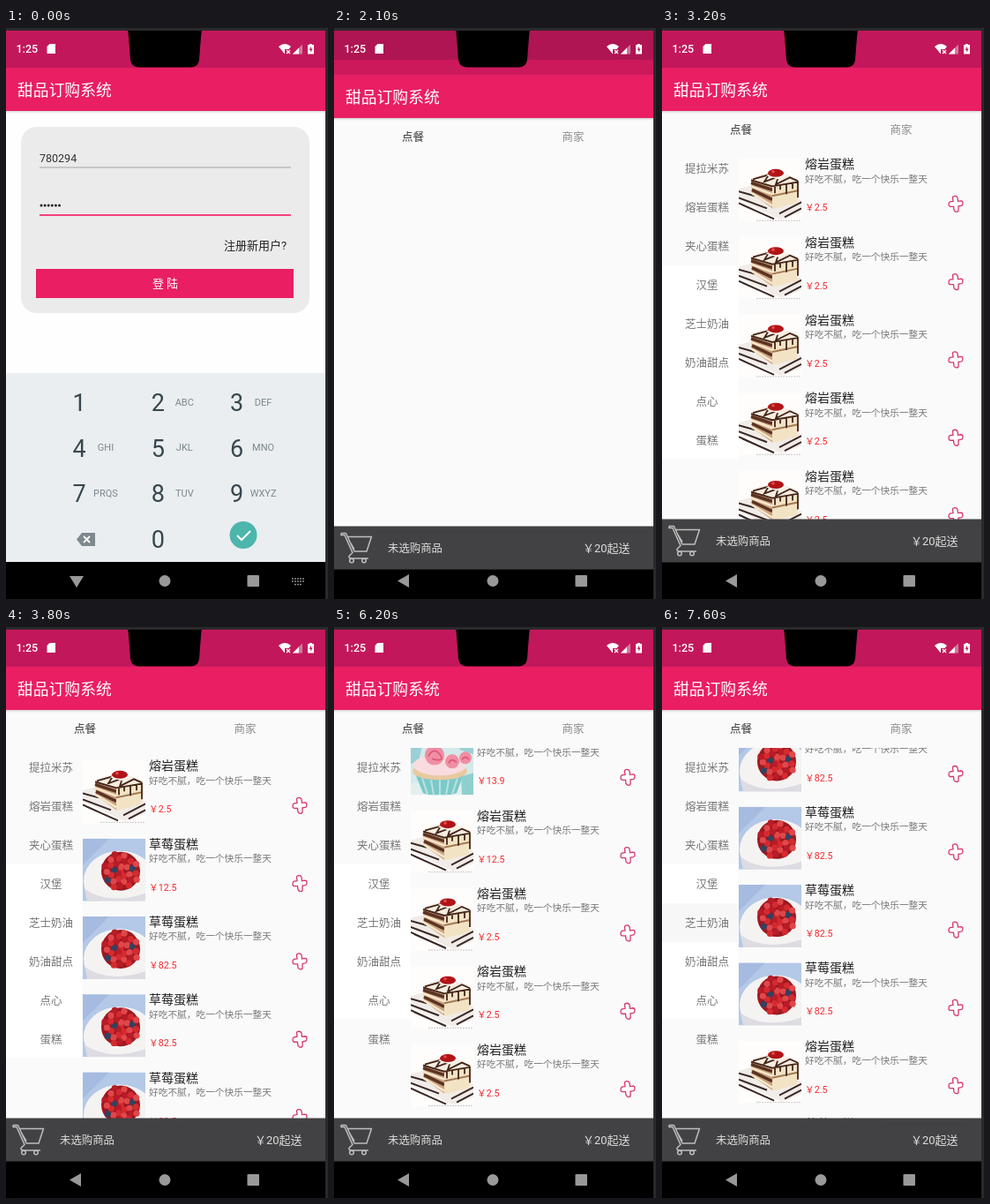
These frames come from a looping animation (365 px wide and 647 px high, 8 s). An HTML page:

```html
<!DOCTYPE html>
<html lang="zh-CN">
<head>
<meta charset="utf-8">
<title>甜品订购系统</title>
<style>
  html, body { margin: 0; width: 100%; height: 100%; overflow: hidden; background: #262626; }
  svg { display: block; }
  #stage { width: 100vw; height: 100vh; }
  text { font-family: Roboto, 'Noto Sans CJK SC', sans-serif; white-space: pre; }
  .mid { text-anchor: middle; }
</style>
</head>
<body>
<svg id="stage" viewBox="0 0 365 647">
  <defs>
    <symbol id="lava" viewBox="0 0 71 71">
      <rect width="71" height="71" fill="#fefdfc"/>
      <path d="M0 34L14 30 71 46V60L48 69 0 46Z" fill="#f1ece8"/>
      <path d="M0 37L18 42M0 44L32 56M4 52L40 68M0 50L22 60M46 62L71 49M52 66L71 56" stroke="#3a2825" stroke-width="2"/>
      <path d="M14 23L38 30V56L15 40Z" fill="#c9a27c"/>
      <path d="M14 27L38 35M15 35L38 46" stroke="#5a3324" stroke-width="3.5"/>
      <path d="M14 31L38 40M15 39L38 53" stroke="#f7e8d0" stroke-width="2.5"/>
      <path d="M38 29L68 25 66 50 38 57Z" fill="#f3e3c5"/>
      <path d="M38 42L67 36" stroke="#a37a52" stroke-width="2"/>
      <path d="M14 23Q26 15 42 16T68 24L38 31Z" fill="#f6ece0"/>
      <path d="M16 23L34 18 29 26 45 20 42 29 58 21 67 25M14 24L38 31 68 26M41 30V39M47 29V35M54 28V40M61 27V34M67 26V44" fill="none" stroke="#432419" stroke-width="1.8"/>
      <path d="M31 19Q41 12 54 19L44 23Z" fill="#fff8ee"/>
      <ellipse cx="42" cy="16" rx="9" ry="4.5" fill="#b01418"/>
      <circle cx="39" cy="14.500" r="1.800" fill="#e6484a"/>
      <path d="M20 70H71" stroke="#c9c4c2" stroke-dasharray="2 1"/>
    </symbol>
    <symbol id="berry" viewBox="0 0 71 71">
      <rect width="71" height="71" fill="#b4c8e8"/>
      <path d="M0 0H30L0 30Z" fill="#a5bbe0"/>
      <ellipse cx="42" cy="48" rx="41" ry="34" fill="#f5f3f2"/>
      <path d="M2 57Q30 76 71 62V71H5Z" fill="#dddce3"/>
      <circle cx="43" cy="37" r="22" fill="#9c1820"/>
      <g id="berries"></g>
    </symbol>
    <symbol id="cupcake" viewBox="0 0 71 71">
      <rect width="71" height="71" fill="#d3eaea"/>
      <path d="M0 0H17L9 32 0 36ZM50 0H71V25L56 20Z" fill="#9ccfd6"/>
      <path d="M0 58L71 46V71H0Z" fill="#e3efee"/>
      <path d="M5 47H60L52 69Q32 75 14 69Z" fill="#7cc9c9"/>
      <path d="M13 52L19 70M23 54L26 71M33 54V71M43 54L40 71M53 52L47 70" stroke="#b9e2df" stroke-width="2"/>
      <ellipse cx="33" cy="44" rx="31" ry="10" fill="#e9c9a0"/>
      <ellipse cx="33" cy="37" rx="30" ry="12" fill="#f9dcdf"/>
      <g fill="#f08ea4"><circle cx="27" cy="26" r="11"/><circle cx="47" cy="33" r="8"/><circle cx="36" cy="7" r="7"/><circle cx="62" cy="29" r="7"/></g>
      <g fill="none" stroke="#d9587a" stroke-width="1.600"><path d="M20 27Q26 16 33 25T24 30M43 35Q46 28 52 34M32 7Q37 2 40 9M58 31Q62 25 66 31"/></g>
      <path d="M57 50L71 46V71H58Z" fill="#8fd0ce"/>
    </symbol>
    <symbol id="orange" viewBox="0 0 71 71">
      <rect width="71" height="71" fill="#f6d58f"/>
      <path d="M0 0H71V18L35 28 0 20Z" fill="#f9e7b9"/>
      <path d="M5 24Q21 16 38 24V40Q20 46 5 39Z" fill="#bd783c"/>
      <path d="M5 30Q21 37 38 30V34Q21 41 5 34Z" fill="#f3d3a0"/>
      <ellipse cx="22" cy="23" rx="16" ry="6" fill="#9a5a2c"/>
      <circle cx="18" cy="16" r="5" fill="#c58a3e"/><circle cx="27" cy="18" r="4" fill="#f3e3c0"/>
      <path d="M36 36Q53 27 69 36V56Q52 63 36 56Z" fill="#e98a35"/>
      <path d="M36 45Q53 53 69 45V50Q53 58 36 50Z" fill="#f8dfa8"/>
      <ellipse cx="52" cy="35" rx="17" ry="7" fill="#f5641c"/>
      <circle cx="51" cy="31" r="5" fill="#fbb24a"/>
      <g fill="#85502a"><circle cx="25" cy="61" r="7"/><circle cx="9" cy="50" r="4"/></g>
      <circle cx="9" cy="60" r="6" fill="#f4b338"/>
      <circle cx="52" cy="9" r="8" fill="#eeb24a"/>
    </symbol>
    <path id="plus" d="M-3.500 -7Q-3.500 -9 -1 -9T2 -7L2.500 -3 6 -3.500Q8 -3.500 8 -1T6.500 2L3 2.500V7Q3 9 1 9T-2 7L-2.500 3H-6Q-8 3 -8 .500T-6.500 -2.500L-3 -3Z" fill="#fff" stroke="#d6346f" stroke-width="1.300"/>
    <linearGradient id="shade" x2="0" y2="1">
      <stop stop-color="#000" stop-opacity=".15"/><stop offset="1" stop-color="#000" stop-opacity="0"/>
    </linearGradient>
  </defs>

  <rect y="3" width="362" height="644" fill="#fefefe"/>
  <rect id="status" y="3" width="362" height="42"/>
  <rect y="605" width="362" height="42"/>

  <g id="login">
    <rect x="17" y="112" width="327" height="211" rx="18" fill="#ebebeb"/>
    <text x="38" y="152" font-size="12.500" fill="#333">780294</text>
    <path d="M38 158H323" stroke="#a3a3a3"/>
    <path d="M40 201H61" stroke="#222" stroke-width="3" stroke-linecap="round" stroke-dasharray="0 4.100"/>
    <path d="M38 212H323" stroke="#f4437f" stroke-width="1.800"/>
    <rect id="cursor" x="61.500" y="192" width="2" height="18" fill="#ff4081"/>
    <text x="247" y="251" font-size="13" fill="#222">注册新用户?</text>
    <rect id="button" x="34" y="273" width="292" height="33"/>
    <text class="mid" x="180.500" y="294" font-size="13" fill="#fff">登 陆</text>
    <rect y="391" width="362" height="214" fill="#eaeef0"/>
    <g id="keys"></g>
    <path d="M80 579.500L86 572H101V587H86Z" fill="#7d898e"/>
    <path d="M88 576L95 583M95 576L88 583" stroke="#fff" stroke-width="1.800"/>
    <circle cx="269" cy="574.500" r="15.500" fill="#4db6ac"/>
    <path d="M262 575L267 580 277 570" fill="none" stroke="#fff" stroke-width="2"/>
  </g>

  <g id="page">
    <rect id="band" y="28" width="362" height="17" fill="#cc195b"/>
    <g id="menu">
      <rect y="94" width="362" height="463" fill="#fafafa"/>
      <text x="77" y="120" font-size="12.500" fill="#333">点餐</text>
      <text x="258.500" y="120" font-size="12.500" fill="#8a8a8a">商家</text>
      <g id="catalog">
        <rect id="unpressed" y="269" width="86.500" fill="#fff"/>
        <rect id="pressed" y="313" width="86.500" height="44" fill="#f7f7f7"/>
        <g id="categories" class="mid" font-size="12.500" fill="#777"></g>
        <svg x="87" y="137" width="275" height="420"><g id="list"></g></svg>
      </g>
      <rect y="556.500" width="362" height="49" fill="#424244"/>
      <g transform="translate(0 -1.500)" fill="none" stroke="#bdbdbd" stroke-width="1.500" stroke-linejoin="round">
        <path d="M8 566H13.500L23 586.500H37L42.500 570H15M17 574L23 584M8 566V568H12L21 588 17 592Q17 594.500 19 594.500H39"/>
        <circle cx="20" cy="597" r="2.300"/><circle cx="34" cy="597" r="2.300"/>
      </g>
      <text x="61" y="585.500" font-size="12.400" fill="#ddd">未选购商品</text>
      <text x="282" y="586" font-size="13" fill="#ddd">￥20起送</text>
    </g>
    <rect y="45" width="362" height="49" fill="#e91e63"/>
    <rect y="94" width="362" height="3" fill="url(#shade)"/>
    <text x="13" y="76.500" font-size="17.800" fill="#fff">甜品订购系统</text>
  </g>

  <path d="M138 3H222Q221.500 5 221 10L219 36Q218 44.500 209 44.500H151Q142 44.500 141 36L139 10Q138.500 5 138 3Z"/>
  <text x="11.500" y="28" font-size="12.500" font-weight="500" fill="#fff">1:25</text>
  <g fill="#fff">
    <path d="M49.500 18H56V29H46.500V21Z"/>
    <path d="M309 21Q316 15 323 21L320.500 24H316V29.500Z"/>
    <path d="M318 25L322 29M322 25L318 29" stroke="#fff" stroke-width="1.300"/>
    <path d="M325 29.500L336 18.500V29.500Z" fill-opacity=".4"/><path d="M325 29.500L332 22.500V29.500Z"/>
    <path d="M344 18H347V19H349V29.500H342V19H344Z"/>
    <path d="M346 20.500L343.800 25H345.300V28L347.500 23.500H346Z" fill="#c2185b"/>
  </g>
  <g fill="#999">
    <path id="back"/>
    <circle cx="180" cy="626.500" r="6.500"/>
    <rect x="273.500" y="620" width="13.500" height="13" rx="1"/>
    <path id="keyboardIcon" d="M324 624H339M324 627H339M327 630.500H336" stroke="#999" stroke-width="1.600" stroke-dasharray="1.800 1.200"/>
  </g>
  <path d="M0 0H365V3H0ZM362 0H365V647H362Z" fill="#2a2a2c"/>
</svg>
<script>
const LOOP = 8000, STEP = 100, ROW = 88.3;
const $ = id => document.getElementById(id);
const show = (id, on) => $(id).setAttribute('display', on ? 'inline' : 'none');
const set = (id, name, value) => $(id).setAttribute(name, value);
const fill = (id, items, draw) => { $(id).innerHTML = items.map(draw).join(''); };

fill('keys', ['', 'ABC', 'DEF', 'GHI', 'JKL', 'MNO', 'PRQS', 'TUV', 'WXYZ', '', ''], (letters, i) => {
  if (i === 9) return '';
  const col = i % 3, y = 434 + 51.7 * Math.floor(i / 3);
  return `<text x="${75.5 + 89.3 * col}" y="${y}" font-size="27" fill="#37474f">${(i + 1) % 11}</text>
    <text class="mid" x="${113 + 89.3 * col}" y="${y - 6.5}" font-size="11" fill="#7b888e">${letters}</text>`;
});

fill('categories', ['提拉米苏', '熔岩蛋糕', '夹心蛋糕', '汉堡', '芝士奶油', '奶油甜点', '点心', '蛋糕'],
  (name, i) => `<text x="51" y="${163.5 + 44 * i}">${name}</text>`);

// Berries packed in a sunflower spiral
fill('berries', [...Array(30).keys()], i => {
  const r = 3.8 * Math.sqrt(i), a = i * 2.4;
  const color = i % 9 === 4 ? '#34415f' : ['#d52a30', '#b81c26', '#e0474a'][i % 3];
  return `<circle cx="${43 + r * Math.cos(a)}" cy="${37 + r * Math.sin(a)}" r="3.6" fill="${color}"/>`;
});

const repeat = (count, ...product) => Array(count).fill(product);
const products = [
  ['orange', '19.5'], ['cupcake', '12.5'], ['cupcake', '13.9'], ['lava', '12.5'],
  ...repeat(5, 'lava', '2.5'), ['berry', '12.5'], ...repeat(4, 'berry', '82.5'),
  ['lava', '2.5'], ...repeat(5, 'berry', '82.5'),
];
fill('list', products, ([photo, price], i) => `<g transform="translate(0 ${14 + ROW * i})">
  <use href="#${photo}" y="-5.500" width="71" height="71"/>
  <text x="75" y="5.500" font-size="14" fill="#222">${photo === 'berry' ? '草莓' : '熔岩'}蛋糕</text>
  <text x="75" y="21" font-size="10.700" fill="#777">好吃不腻，吃一个快乐一整天</text>
  <text x="75" y="53.500" font-size="10.700" fill="#f4282d">￥${price}</text>
  <use href="#plus" x="246" y="45.500"/></g>`);

const LIST_END = products.length * ROW - 420;
const clamp = x => Math.min(1, Math.max(0, x));
const fling = (t, start, end, from, to) =>
  from + (to - from) * (1 - (1 - clamp((t - start) / (end - start))) ** 2.25);

function scrollAt(t) {
  if (t < 4300) return fling(t, 2950, 3900, 0, 705);
  if (t < 5200) return LIST_END;
  if (t < 6550) return fling(t, 5450, 6400, 0, 209);
  return fling(t, 6550, 7600, 209, 913);
}

function render(t) {
  const inMenu = t >= 1940;
  const slide = inMenu ? 26 * (1 - clamp((t - 1940) / 360)) ** 2 : 0;
  show('login', !inMenu);
  show('menu', inMenu);
  show('band', slide > 0);
  show('keyboardIcon', !inMenu);
  show('catalog', t >= 2400);
  show('cursor', (t >= 100 && t < 600) || t >= 1000);
  show('pressed', t >= 7400);
  set('status', 'fill', slide > 0 ? '#ae1552' : '#c2185b');
  set('button', 'fill', t >= 1900 ? '#d81b5c' : '#e91e63');
  set('back', 'd', inMenu ? 'M72 626.500L85 619V634Z' : 'M72 621H88L80 634Z');
  set('unpressed', 'height', t < 4300 ? 219 : 175);
  set('page', 'transform', `translate(0 ${slide})`);
  set('list', 'transform', `translate(0 ${-scrollAt(t)})`);
}

function tick(now) {
  render(Math.floor((now % LOOP) / STEP) * STEP);
  requestAnimationFrame(tick);
}
render(0);
requestAnimationFrame(tick);
</script>
</body>
</html>
```
